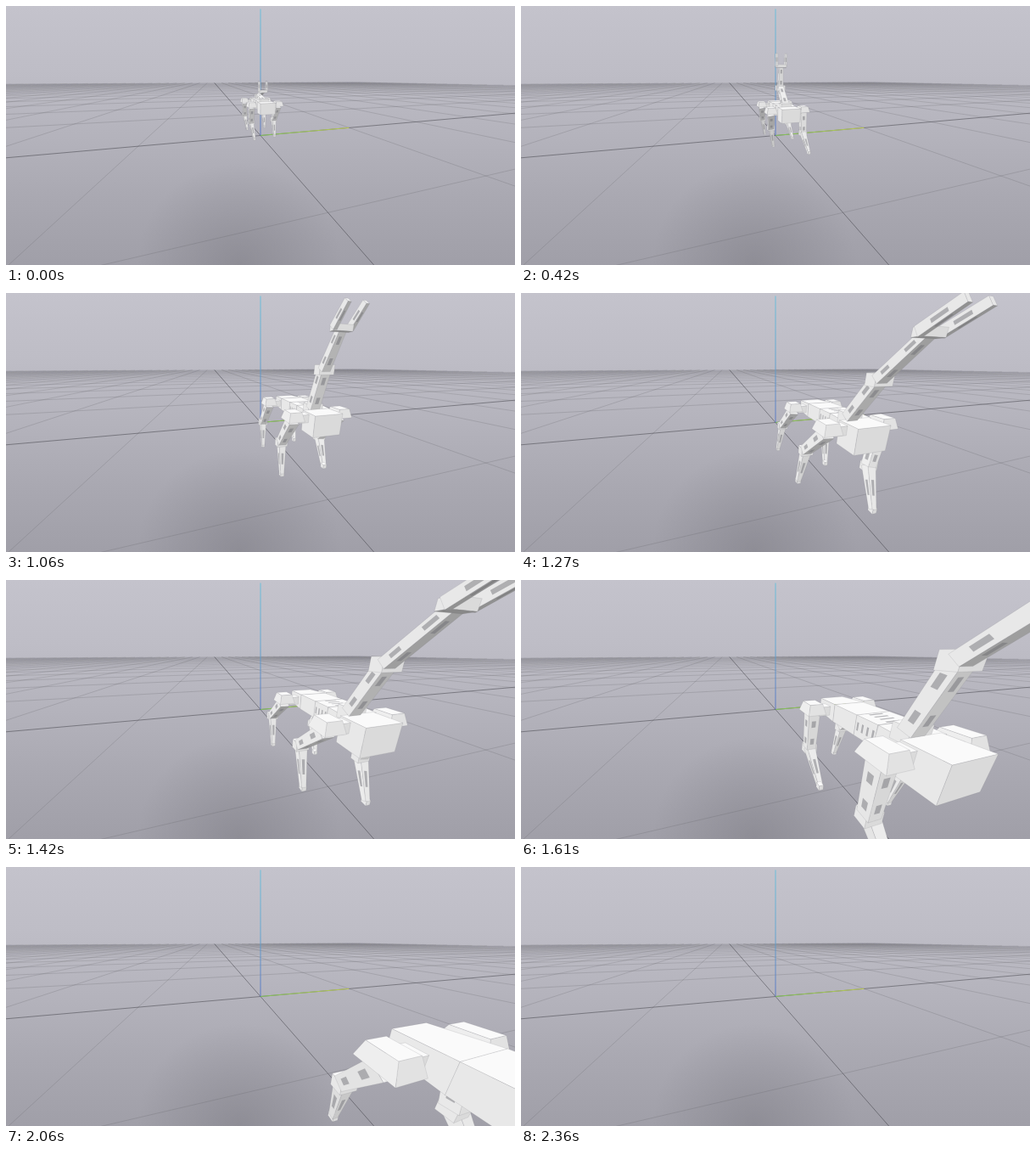
An HTML page with a canvas for the animation above (2.76 s loop, 600 px wide and 305 px high).

```html
<!DOCTYPE html>
<html lang="en">
<head>
<meta charset="utf-8">
<title>Walking robot</title>
<style>
  html, body { margin: 0; width: 100%; height: 100%; overflow: hidden; background: #b5b4bc; }
  canvas { display: block; }
</style>
</head>
<body>
<canvas id="stage" width="600" height="305"></canvas>
<script>
const ctx = document.getElementById('stage').getContext('2d');
const LOOP = 2760, WALK = 2360, STEP = WALK / 78;

// Camera: 3 units from the origin, 1 unit high, looking at the origin.
const FOCAL = 198.7, NEAR = 0.04;
const COS_A = 0.9636, SIN_A = 0.267, COS_P = 0.9487, SIN_P = 0.3162;
const EYE = [3 * COS_A, -3 * SIN_A, 1];

const add = (a, b, k = 1) => a.map((c, i) => c + b[i] * k);
const sub = (a, b) => add(a, b, -1);
const dot = (a, b) => a[0] * b[0] + a[1] * b[1] + a[2] * b[2];
const cross = (a, b) => [a[1] * b[2] - a[2] * b[1], a[2] * b[0] - a[0] * b[2], a[0] * b[1] - a[1] * b[0]];
const unit = a => a.map(c => c / Math.hypot(...a));
const mix = (a, b, k) => a.map((c, i) => c + (b[i] - c) * k);

function toCamera([x, y, z]) {
  const forward = 3 - COS_A * x + SIN_A * y, up = z - 1;
  return [SIN_A * x + COS_A * y, -up * COS_P - forward * SIN_P, forward * COS_P - up * SIN_P];
}
const toScreen = ([x, y, z]) => [300 + FOCAL * x / z, 152.5 + FOCAL * y / z];

// Builds a path from world points, cut at the near plane.
function trace(points, closed) {
  const cam = points.map(toCamera), out = [];
  cam.forEach((p, i) => {
    if (p[2] >= NEAR) out.push(p);
    if (!closed && i === cam.length - 1) return;
    const q = cam[(i + 1) % cam.length];
    if ((p[2] < NEAR) !== (q[2] < NEAR)) out.push(mix(p, q, (NEAR - p[2]) / (q[2] - p[2])));
  });
  ctx.beginPath();
  out.forEach(p => ctx.lineTo(...toScreen(p)));
  if (closed) ctx.closePath();
}

function line(a, b, style, width) {
  trace([a, b]);
  ctx.strokeStyle = style;
  ctx.lineWidth = width;
  ctx.stroke();
}

function gradient(x0, y0, x1, y1, ...colors) {
  const g = ctx.createLinearGradient(x0, y0, x1, y1);
  colors.forEach((c, i) => g.addColorStop(i / (colors.length - 1), c));
  return g;
}

function drawScene() {
  ctx.fillStyle = gradient(0, 0, 0, 305, '#c4c3cc', '#bebdc6', '#b4b3bc', '#a9a8b1', '#a09fa8');
  ctx.fillRect(0, 0, 600, 305);
  const shade = ctx.createRadialGradient(275, 305, 0, 275, 305, 120);
  shade.addColorStop(0, 'rgba(120,119,127,.45)');
  shade.addColorStop(1, 'rgba(120,119,127,0)');
  ctx.fillStyle = shade;
  ctx.fillRect(150, 180, 260, 125);

  for (let i = -50; i <= 50; i += 2) {
    const style = i ? `rgba(90,90,94,${0.32 * (1 - Math.abs(i) / 58)})` : 'rgba(50,50,55,.65)';
    line([i, -50, 0], [i, 50, 0], style, 0.7);
    line([-50, i, 0], [50, i, 0], style, 0.7);
  }
  line([0, 0, 0], [0, 2, 0], gradient(300, 0, 403, 0, '#7fcb50', '#c3d24c'), 0.9);
  line([0, 0, 0], [0, 0, 2], gradient(0, 152, 0, 4, '#5272c4', '#5ba3d0', '#62bedb'), 0.9);
}

// A tapered box from p to q; w is across, h is the thickness.
function box(p, q, w, h, slots = 0, taper = 1) {
  const axis = unit(sub(q, p));
  const n = unit(cross(axis, Math.abs(axis[1]) > 0.8 ? [1, 0, 0] : [0, 1, 0]));
  const v = cross(n, axis);
  const ring = (c, k) => [[-1, -1], [1, -1], [1, 1], [-1, 1]]
    .map(([a, b]) => add(add(c, v, a * k * w / 2), n, b * k * h / 2));
  return { a: ring(p, 1), b: ring(q, taper), mid: mix(p, q, 0.5), slots };
}

function drawFace(face, mid, slots) {
  const center = mix(face[0], face[2], 0.5);
  let normal = unit(cross(sub(face[1], face[0]), sub(face[3], face[0])));
  if (dot(normal, sub(center, mid)) < 0) normal = normal.map(c => -c);
  if (dot(normal, sub(EYE, center)) <= 0) return;
  const [nx, ny, nz] = normal;
  const tone = Math.round(226 + (nz > 0 ? 24 : 90) * nz - 8 * nx - 6 * ny);
  trace(face, true);
  ctx.fillStyle = `rgb(${tone},${tone},${tone})`;
  ctx.fill();
  ctx.strokeStyle = 'rgba(130,130,136,.35)';
  ctx.lineWidth = 0.5;
  ctx.stroke();
  const at = (s, t) => mix(mix(face[0], face[1], s), mix(face[3], face[2], s), t);
  for (let i = 0; i < slots; i++) {
    const s0 = (i + 0.35) / slots, s1 = (i + 0.7) / slots;
    trace([at(s0, 0.3), at(s1, 0.3), at(s1, 0.7), at(s0, 0.7)], true);
    ctx.fillStyle = 'rgba(105,105,110,.45)';
    ctx.fill();
  }
}

function drawBox({ a, b, mid, slots }) {
  drawFace(a, mid, 0);
  drawFace(b, mid, 0);
  for (let i = 0; i < 4; i++) {
    const j = (i + 1) % 4;
    drawFace([a[i], b[i], b[j], a[j]], mid, slots);
  }
}

// time, x, y, foot sway, then arm angles from upright: shoulder, elbow, wrist
const POSES = [
  [0, -0.15, 0.03, 0, -80, 70, 0],
  [420, 0.44, -0.04, 0.06, -45, 0, 5],
  [850, 1.04, 0.05, -0.05, 0, 10, 20],
  [1270, 1.62, 0.06, -0.13, 35, 45, 60],
  [1610, 2.11, 0.03, -0.03, 16, 45, 60],
  [1850, 2.54, 0.01, 0, 16, 45, 60],
  [2360, 3.3, 0, 0, 16, 45, 60]
];

function poseAt(t) {
  const i = Math.max(1, POSES.findIndex(p => p[0] >= t));
  const a = POSES[i - 1], b = POSES[i];
  return mix(a, b, (t - a[0]) / (b[0] - a[0]));
}

function legParts(t, end, side, sway, put) {
  const phase = 2 * Math.PI * (t - 420) / 820;
  const reach = 0.22 * Math.min(1, 0.2 + t / 400) * side * Math.cos(phase);
  const lift = 0.07 * Math.max(0, -side * Math.sin(phase));
  const x = end * 0.32, y = side * 0.23, hipZ = 0.56, bone = 0.3;
  const footY = side * 0.2 + sway, footZ = 0.02 + lift;
  const dx = reach, dz = footZ - hipZ, d = Math.min(Math.hypot(dx, dz), 0.599);
  const bend = Math.sqrt(bone * bone - d * d / 4) / d;
  const hip = [x, y, hipZ], foot = [x + dx, footY, footZ];
  const knee = [x + dx / 2 + dz * bend, (y + footY) / 2, hipZ + dz / 2 - dx * bend];
  put([x, side * 0.1, 0.58], [x, side * 0.19, 0.58], 0.08, 0.07);
  put([x, y, 0.57], [x, y, 0.645], 0.14, 0.17, 0, 0.72);
  put(hip, knee, 0.09, 0.085, 2, 0.85);
  put(add(knee, [0, -0.05, 0]), add(knee, [0, 0.05, 0]), 0.07, 0.07);
  put(knee, foot, 0.07, 0.07, 1, 0.5);
  put(add(foot, [0, 0, 0.02]), add(foot, [0, 0, -0.02]), 0.035, 0.04);
}

function armParts(angles, put) {
  const joints = [[0.25, 0, 0.64]];
  [0.35, 0.3, 0.16].forEach((length, i) => {
    const a = angles[i] * Math.PI / 180;
    joints.push(add(joints[i], [Math.sin(a), 0, Math.cos(a)], length));
  });
  const [base, elbow, wrist, tip] = joints;
  const bar = (p, half, size) => put(add(p, [0, -half, 0]), add(p, [0, half, 0]), size, size);
  bar(base, 0.07, 0.09);
  put(base, elbow, 0.09, 0.075, 2, 0.9);
  bar(elbow, 0.065, 0.075);
  put(elbow, wrist, 0.075, 0.06, 2, 0.75);
  bar(wrist, 0.075, 0.04);
  for (const y of [-0.065, 0.065]) put(add(wrist, [0, y, 0]), add(tip, [0, y, 0]), 0.03, 0.05, 1, 0.8);
}

function drawRobot(t) {
  const [, x, y, sway, ...arm] = poseAt(t);
  const parts = [];
  const put = (p, q, ...size) => parts.push(box(add(p, [x, y, 0]), add(q, [x, y, 0]), ...size));
  put([-0.2, 0, 0.59], [-0.42, 0, 0.59], 0.24, 0.13, 0, 0.85);
  put([-0.2, 0, 0.59], [0.02, 0, 0.59], 0.24, 0.13);
  put([0.02, 0, 0.59], [0.17, 0, 0.59], 0.24, 0.13, 4);
  put([0.17, 0, 0.59], [0.32, 0, 0.58], 0.24, 0.13);
  put([0.3, 0, 0.55], [0.485, 0, 0.55], 0.25, 0.18);
  for (const end of [-1, 1]) for (const side of [-1, 1]) legParts(t, end, side, sway, put);
  armParts(arm, put);
  const far = part => dot(sub(part.mid, EYE), sub(part.mid, EYE));
  parts.sort((a, b) => far(b) - far(a)).forEach(drawBox);
}

ctx.lineJoin = 'round';
function frame() {
  const now = performance.now() % LOOP;
  drawScene();
  if (now < WALK) drawRobot(Math.floor(now / STEP) * STEP);
  requestAnimationFrame(frame);
}
frame();
</script>
</body>
</html>
```
